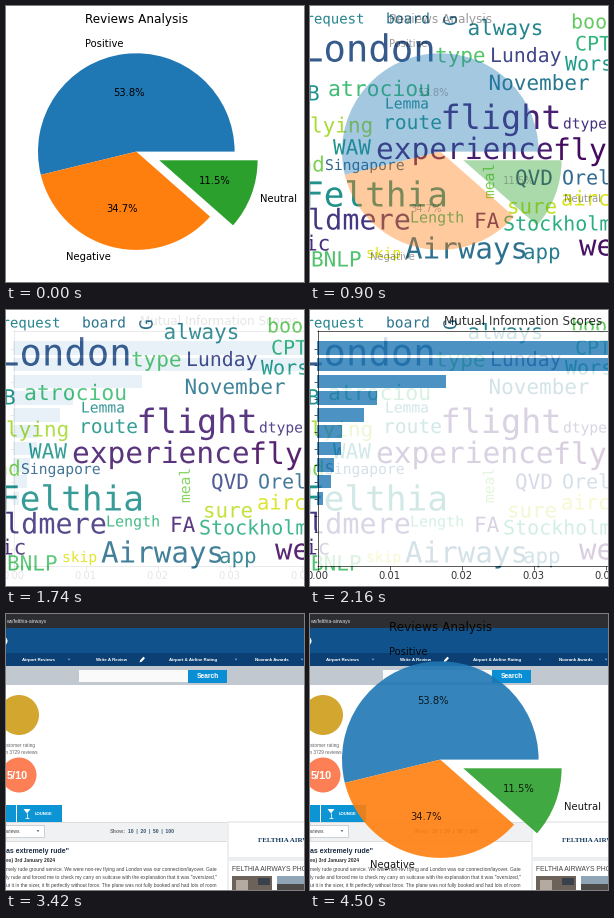
Recreate the animation shown at these times as a matplotlib script. Size 298 by 276 pixels, loop 4.56 s.

```python
import matplotlib.pyplot as plt
import numpy as np
from matplotlib.animation import FuncAnimation
from matplotlib.patches import Circle, PathPatch, Polygon, Rectangle, Wedge
from matplotlib.path import Path
from matplotlib.textpath import TextPath
from matplotlib.transforms import Affine2D

W, H, DPI = 298, 276, 64
PT = 72 / DPI  # points per pixel
STEP_MS, HOLD, FADE = 60, 10, 9
SLIDE = HOLD + FADE
BLUE, ORANGE, GREEN = "#1f77b4", "#ff7f0e", "#2ca02c"
SITE, WORDS, COVER, TOP = 1, 2, 3, 5

fig = plt.figure(figsize=(W / DPI, H / DPI), dpi=DPI, facecolor="white")
ax = fig.add_axes([0, 0, 1, 1])
ax.set(xlim=(0, W), ylim=(H, 0))
ax.axis("off")


def label(x, y, s, size, z, color="black", font="DejaVu Sans", **kw):
    return ax.text(x, y, s, fontsize=size * PT, color=color, family=font,
                   zorder=z, clip_on=True, parse_math=False, **kw)


def add(patch):
    return ax.add_patch(patch)


def rect(x0, y0, x1, y1, color, z, edge="none"):
    return add(Rectangle((x0, y0), x1 - x0, y1 - y0, facecolor=color,
                         edgecolor=edge, linewidth=0.8 * PT * (edge != "none"), zorder=z))


def line(x0, y0, x1, y1, z, color="black", width=0.8):
    return ax.plot([x0, x1], [y0, y1], color=color, lw=width * PT, zorder=z,
                   solid_capstyle="butt")[0]


def box_path(x0, y0, x1, y1, flip=False):
    points = [(x0, y0), (x1, y0), (x1, y1), (x0, y1), (x0, y0)]
    return Path(points[::-1] if flip else points, closed=True)


def with_holes(box, holes):
    return Path.make_compound_path(box_path(*box, flip=True), *holes)


def white(path, z):
    return add(PathPatch(path, facecolor="white", linewidth=0, zorder=z))


# Pie slide
def make_pie():
    cx, cy, radius = 130.3, 145.6, 98.3
    wedges, texts, shares = [], [], []
    start = 0
    slices = [("Positive", 53.8, BLUE, 0), ("Negative", 34.7, ORANGE, 0),
              ("Neutral", 11.5, GREEN, 0.25)]
    for name, share, color, explode in slices:
        end = start + share * 3.6
        mid = np.radians((start + end) / 2)

        def at(dist):
            reach = radius * (dist + explode)
            return cx + reach * np.cos(mid), cy - reach * np.sin(mid)

        wedges.append(add(Wedge(at(0), radius, -end, -start, facecolor=color,
                                linewidth=0, zorder=TOP)))
        side = "left" if np.cos(mid) > 0 else "right"
        texts.append(label(*at(1.1), name, 10, TOP + 1, ha=side, va="center"))
        shares.append(label(*at(0.6), f"{share}%", 10, TOP + 1, ha="center", va="center"))
        start = end
    texts.append(label(cx, 17, "Reviews Analysis", 12, TOP + 1, ha="center"))
    cover = white(with_holes((0, 0, W, H), [w.get_path() for w in wedges]), COVER)
    return wedges + texts, shares, [cover]


# Bar slide
AXES = (7, 20, 300, 256)


def make_bars():
    left, top, right, bottom = AXES
    scores = [0.0500, 0.0450, 0.0179, 0.0083, 0.0065, 0.0035, 0.0034,
              0.0024, 0.0019, 0.0008]
    rows = 38 + 16.7 * np.arange(13)
    boxes = [(left, round(y - 6.7), min(right, round(left + s * 7200)), round(y + 6.7))
             for y, s in zip(rows, scores)]
    parts = [white(with_holes(AXES, [box_path(*b) for b in boxes]), TOP)]
    parts += [rect(*b, BLUE, TOP) for b in boxes]
    parts += [line(left + .5, top, left + .5, bottom, TOP),
              line(left, top + .5, right, top + .5, TOP),
              line(left, bottom - .5, right, bottom - .5, TOP)]
    parts += [line(left - 3.5, int(y) + .5, left, int(y) + .5, TOP) for y in rows]
    for k in range(5):
        x = left + .5 + 72 * k
        parts.append(line(x, bottom, x, bottom + 3.5, TOP))
        parts.append(label(x, 269, f"{k / 100:.2f}", 10, TOP, ha="center"))
    parts.append(label(213.5, 15, "Mutual Information Scores", 12, TOP, ha="center"))
    return parts


# Word slide: text, left, baseline, size, viridis position, angle
CLOUD = [
    ("request", -4.5, 17.5, 14, .45, 0), ("board", 76, 17.5, 14.6, .38, 0),
    ("G", 146.5, 20, 18, .36, 90), ("always", 157.5, 29, 21, .45, 0),
    ("book", 261, 22.5, 20, .76, 0), ("London", -9, 55.5, 37.3, .28, 0),
    ("type", 125, 56.5, 21, .73, 0), ("Lunday", 180, 56, 19.8, .21, 0),
    ("CPT", 265, 44.5, 20, .66, 0), ("Worst", 255, 64.5, 20, .55, 0),
    ("November", 178.5, 84, 21, .40, 0), ("B", -3, 94.5, 21, .50, 0),
    ("atrociou", 18, 90, 21.4, .69, 0), ("Lemma", 75, 102.5, 14.6, .48, 0),
    ("route", 73, 123, 19.6, .52, 0), ("flight", 130.5, 123, 33.5, .09, 0),
    ("dtype", 253, 122.5, 14.6, .14, 0), ("lying", 0, 126.5, 21, .87, 0),
    ("WAW", 23, 148.5, 21, .52, 0), ("experience", 66, 153, 29.5, .08, 0),
    ("fly", 243, 154, 29.8, .03, 0), ("nd", -10.5, 165.5, 21, .80, 0),
    ("Singapore", 15, 164, 14.7, .33, 0), ("meal", 184, 193, 14.6, .80, 90),
    ("QVD", 205, 179, 21, .23, 0), ("Orel", 252, 178.5, 20, .34, 0),
    ("Felthia", -7, 200.5, 34.4, .50, 0), ("sure", 197, 207.5, 20.8, .90, 0),
    ("airc", 251, 199.5, 20.5, .94, 0), ("ldmere", -2, 223.5, 28.5, .16, 0),
    ("Length", 100, 216.5, 15, .66, 0), ("FA", 164, 222, 21, .10, 0),
    ("Stockholm", 193, 224.5, 20, .63, 0), ("ic", -5, 244.5, 21, .13, 0),
    ("BNLP", 1, 260.5, 21, .72, 0), ("skip", 56, 252, 14.6, .95, 0),
    ("Airways", 95, 252.5, 29.2, .37, 0), ("app", 213, 253, 20.8, .42, 0),
    ("we", 269, 249.5, 29, .04, 0),
]


def make_words(z, clip=None):
    parts = []
    for word, x, y, size, tone, angle in CLOUD:
        glyphs = TextPath((0, 0), word, size=size, prop={"family": "DejaVu Sans Mono"})
        place = Affine2D().rotate_deg(angle).scale(1, -1).translate(x, y)
        patch = add(PathPatch(place.transform_path(glyphs), linewidth=0, zorder=z,
                              facecolor=plt.cm.viridis(tone)))
        if clip is not None:
            patch.set_clip_path(clip, ax.transData)
        parts.append(patch)
    return parts


# Website slide
def make_site():
    parts = []

    def block(x0, y0, x1, y1, color, edge="none"):
        parts.append(rect(x0, y0, x1, y1, color, SITE, edge))

    def write(x, y, s, size, color="#444444", weight="normal", ha="left",
              font="Liberation Sans"):
        parts.append(label(x, y, s, size, SITE, color, font, weight=weight, ha=ha))

    def shape(points, color):
        parts.append(add(Polygon(points, facecolor=color, linewidth=0, zorder=SITE)))

    def disc(x, y, r, color):
        parts.append(add(Circle((x, y), r, facecolor=color, linewidth=0, zorder=SITE)))

    def arrow(x, y, color):
        shape([(x - 1.4, y - .8), (x + 1.4, y - .8), (x, y + 1)], color)

    block(0, 0, W, H, "white")
    block(0, 0, W, 14, "#2d2e31")
    write(0, 9, "ws/felthia-airways", 5, "#dddddd")
    block(0, 14, W, 39, "#10528c")
    disc(-3, 27, 4.5, "white")
    block(0, 39, W, 52, "#0c3f73")
    for x, name in [(32, "Airport Reviews"), (106, "Write A Review"),
                    (187, "Airport & Airline Rating"), (266, "Novrank Awards")]:
        write(x, 47, name, 4.4, "white", "bold", "center")
    for x in (63, 230, 296):
        arrow(x, 45.5, "#7fa6cc")
    shape([(133.5, 48.5), (134.3, 46), (137.5, 42.7), (139, 44.2), (135.8, 47.6)], "white")

    block(0, 52, W, 71, "#c1c8d0")
    block(73, 56, 182, 68, "#fafafa")
    block(182, 55.5, 221, 68.5, "#0a8fd4")
    write(201.5, 64.3, "Search", 6.6, "white", "bold", "center")

    disc(13, 101, 20, "#d3a62f")
    write(-2, 133, "ustomer rating", 4.7, "#666666")
    write(-2, 140, "m 3729 reviews", 4.7, "#666666")
    disc(13, 161, 17.5, "#fc7f56")
    write(0.5, 165, "5/10", 11, "white", "bold")

    block(0, 191, 10, 208, "#0c94d5")
    block(11, 191, 56, 208, "#0c94d5")
    shape([(17.5, 195), (24.5, 195), (21, 199.5)], "white")
    parts.append(line(21, 199, 21, 203.5, SITE, "white"))
    parts.append(line(18.8, 203.5, 23.2, 203.5, SITE, "white"))
    write(29, 201, "LOUNGE", 4.3, "white", "bold")

    block(0, 208, 221, 227, "#f0f1f2", "#d5d8db")
    block(-2, 211, 38, 223, "white", "#c4c8cc")
    write(-1, 219, "eviews", 5)
    arrow(32, 217, "#555555")
    write(104, 219, "Show:", 5.2, "#777777", "bold")
    write(121.5, 219, "10  |  20  |  50  |  100", 5, "#35506b", "bold")
    write(0, 239, "as extremely rude\"", 7, "#1f2f45", "bold")
    write(0, 248, "es) 3rd January 2024", 4.9, "#333333", "bold")
    body = ["mely rude ground service. We were non-rev flying and London was our "
            "connection/layover. Gate",
            "ly rude and forced me to check my carry on suitcase with the explanation "
            "that it was \"oversized,\"",
            "ut it in the sizer, it fit perfectly without force. The plane was not fully "
            "booked and had lots of room"]
    for k, text in enumerate(body):
        write(0, 257 + 8 * k, text, 4.85)

    block(221, 207, W, H, "#eceeef")
    block(223, 209, W, 243, "white")
    write(252, 228, "FELTHIA AIRWAYS", 7, "#12395f", "bold", font="Liberation Serif")
    block(223, 247, W, H, "white")
    write(226, 257, "FELTHIA AIRWAYS PHOTOS", 6.8)
    block(226, 262, 266, H, "#6d6259")
    block(230, 266, 242, H, "#b5aaa0")
    block(252, 264, 264, 271, "#39414a")
    block(271, 262, W, H, "#8fa5b5")
    block(271, 270, W, H, "#4d4a48")
    return parts


site = make_site()
words = make_words(WORDS)
pie, pie_shares, pie_cover = make_pie()
border = with_holes((0, 0, W, H), [box_path(*AXES)])
edge_words = [white(border, COVER)] + make_words(COVER + 1, border)
bars = make_bars()


def show(parts, alpha):
    for part in parts:
        part.set_visible(bool(alpha))
        part.set_alpha(float(alpha))


def update(i):
    slide, step = divmod(i, SLIDE)
    t = max(0, step - HOLD + 1) / (FADE + 1)
    # Clear areas of a chart switch at half fade, the rest blends.
    early = t < 0.5
    show(site, slide == 3 or (slide == 2 and t > 0))
    show(words, slide == 1 or (slide == 0 and t > 0))
    show(pie_cover, slide == 0 and early)
    show(edge_words, slide == 2 and early)
    pie_alpha = {0: 1 - t, 3: t}.get(slide, 0)
    show(pie, pie_alpha)
    # Weaker, since these lie on wedges that are already blended.
    show(pie_shares, pie_alpha / (2 - pie_alpha))
    show(bars, {1: t, 2: 1 - t}.get(slide, 0))
    return []


anim = FuncAnimation(fig, update, frames=4 * SLIDE, interval=STEP_MS, repeat=True,
                     repeat_delay=0, blit=False)
plt.show()
```
